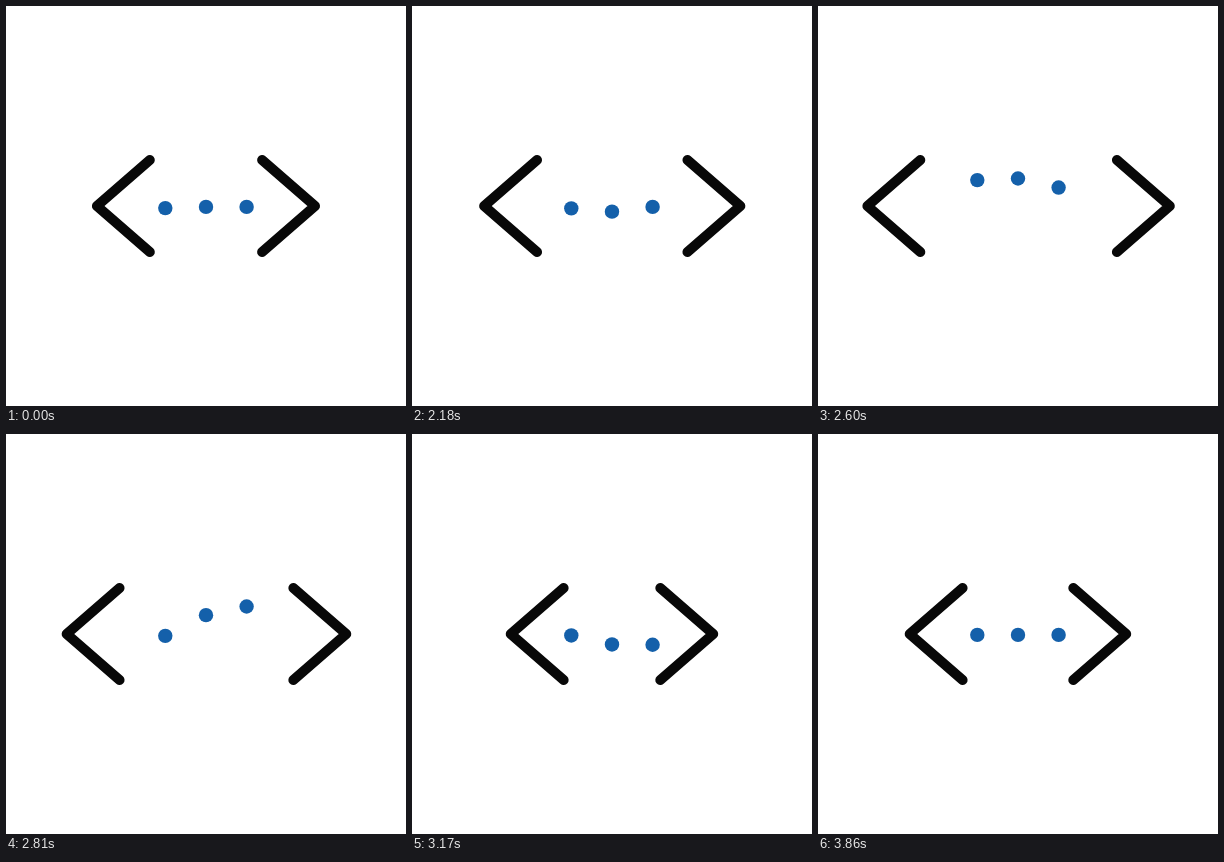
Write an HTML page with a canvas that moves like this. It is 400 by 400 pixels and loops after 3.92 s.

```html
<!DOCTYPE html>
<html lang="en">
<head>
<meta charset="utf-8">
<title>Loading</title>
<style>
html, body { margin: 0; width: 100%; height: 100%; overflow: hidden; background: #fff; }
canvas { display: block; width: 400px; height: 400px; }
</style>
</head>
<body>
<canvas id="stage" width="400" height="400"></canvas>
<script>
const ctx = document.getElementById('stage').getContext('2d');
const LOOP = 3920, HOLD = 2030, STEP = 30, LAST = 3860;

// Keys are [time, value] pairs, joined by a smooth ease
const spread = peak => [[1963, 0], [2420, peak], [2622, peak], [3243, -9], [3560, 0]];
const leftKeys = spread(42.3);
const rightKeys = spread(43.6);
const bounce = [[0, 0], [120, 7.6], [462, -28.4], [583, -28.4], [975, 12], [1315, -3.6], [1610, 0]];
const dots = [159.3, 200, 240.6];
const BOUNCE_START = 1970, DELAY = 140;

function valueAt(keys, t) {
  if (t <= keys[0][0]) return keys[0][1];
  for (let i = 1; i < keys.length; i++) {
    const [t0, a] = keys[i - 1], [t1, b] = keys[i];
    if (t < t1) {
      const u = (t - t0) / (t1 - t0);
      return a + (b - a) * u * u * (3 - 2 * u);
    }
  }
  return keys[keys.length - 1][1];
}

function bracket(tip, x) {
  ctx.beginPath();
  ctx.moveTo(tip, 154);
  ctx.lineTo(x, 200);
  ctx.lineTo(tip, 246);
  ctx.stroke();
}

function draw(t) {
  ctx.fillStyle = '#fff';
  ctx.fillRect(0, 0, 400, 400);

  ctx.strokeStyle = '#080808';
  ctx.lineWidth = 10;
  ctx.lineCap = ctx.lineJoin = 'round';
  const l = valueAt(leftKeys, t), r = valueAt(rightKeys, t);
  bracket(144.6 - l, 91.7 - l);
  bracket(255.3 + r, 308.2 + r);

  ctx.fillStyle = '#1460aa';
  dots.forEach((x, i) => {
    ctx.beginPath();
    ctx.arc(x, 200.9 + valueAt(bounce, t - BOUNCE_START - i * DELAY), 7.2, 0, Math.PI * 2);
    ctx.fill();
  });
}

// The pose rests for the first part of the loop, then advances in even steps
function pose(t) {
  if (t < HOLD) return HOLD - STEP;
  return Math.min(LAST, HOLD + Math.floor((t - HOLD) / STEP) * STEP);
}

const start = performance.now();
function tick() {
  draw(pose((performance.now() - start) % LOOP));
  requestAnimationFrame(tick);
}
tick();
</script>
</body>
</html>
```
